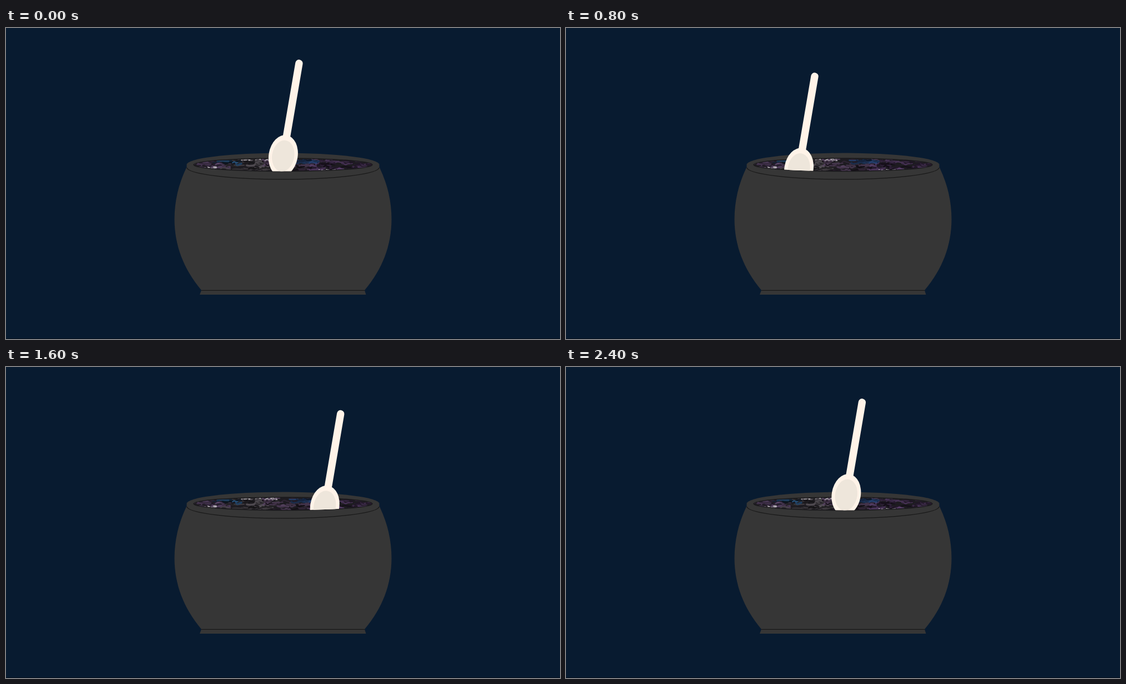
Write an HTML page that moves like this. It is 998 px wide and 561 px high and loops after 2.52 s.

```html
<!DOCTYPE html>
<html lang="en">
<head>
<meta charset="utf-8">
<title>Stirring the pot</title>
<style>
  html, body { margin: 0; width: 100%; height: 100%; overflow: hidden; background: #081b30; }
  svg { display: block; width: 100vw; height: 100vh; }

  /* One lap at constant speed, in 40 ms steps, with a short rest at the end */
  #spoon {
    transform-box: view-box;
    transform-origin: 0 0;
    offset-path: path("M0 0C-42 0 -85 3 -108 9.3Q-122 13.5 -110 17C-92 22 -60 28 -24.5 28C10 28 60 24 91.5 18C112 15.5 118 15 113.5 7.5C110 4 85 4 60 2.4C40 1 20 0 0 0Z");
    offset-rotate: 0deg;
    animation: stir 2520ms infinite;
  }
  @keyframes stir {
    0% { offset-distance: 0%; animation-timing-function: steps(60, end); }
    95.238%, 100% { offset-distance: 98.84%; }
  }
</style>
</head>
<body>
<svg viewBox="0 0 998 561">
  <defs>
    <clipPath id="soupClip"><ellipse cx="499" cy="246.7" rx="161" ry="11.8"/></clipPath>
    <clipPath id="rimClip"><path d="M0 0H998V246.7H660A161 11.8 0 0 1 338 246.7H0Z"/></clipPath>
  </defs>
  <rect width="998" height="561" fill="#081b30"/>
  <rect y="560" width="998" height="1" fill="#040e1a"/>

  <g fill="#363636">
    <path d="M325 252C311 281 303.5 312 303.5 345C303.5 392 320 435 352 473H646C678 435 694.5 392 694.5 345C694.5 312 687 281 673 252Z"/>
    <path d="M352 473H646L648.5 481H349Z"/>
    <path d="M325.5 246.5A173.5 21 0 0 1 672.5 246.5V252A173.5 21.7 0 0 1 325.5 252Z"/>
  </g>
  <g fill="none" stroke="#181818" stroke-width="1.2">
    <path d="M352 473.3H646"/>
    <path d="M325.8 252A173.3 21.7 0 0 0 672.2 252"/>
  </g>

  <g clip-path="url(#soupClip)">
    <rect x="336" y="233" width="326" height="27" fill="#1d1b20"/>
    <g id="soup" fill="none" stroke-linecap="round"></g>
  </g>
  <ellipse cx="499" cy="246.7" rx="161" ry="11.8" fill="none" stroke="#1a1a1c" stroke-width="1.5"/>

  <g clip-path="url(#rimClip)">
    <g id="spoon">
      <path d="M527.9 63.8L504.7 200" stroke="#fff3e8" stroke-width="13.4" stroke-linecap="round"/>
      <g transform="rotate(9.7 499.4 230.2)">
        <ellipse cx="499.4" cy="230.2" rx="26.1" ry="37.3" fill="#fff3e8"/>
        <ellipse cx="499.4" cy="230.7" rx="20" ry="28.4" fill="#eee6db"/>
      </g>
    </g>
  </g>
</svg>
<script>
const soup = document.getElementById('soup');

let seed = 7;
const rand = (a, b) => {
  seed = (seed * 16807) % 2147483647;
  return a + (b - a) * seed / 2147483647;
};

function add(name, attrs) {
  const el = document.createElementNS('http://www.w3.org/2000/svg', name);
  for (const key in attrs) el.setAttribute(key, attrs[key]);
  soup.append(el);
}

// Curly strands of one hue between x0 and x1
function strands(count, x0, x1, hue, sat, y0 = 236, y1 = 258) {
  for (let i = 0; i < count; i++) {
    const x = rand(x0, x1), y = rand(y0, y1), w = rand(4, 10), h = rand(-4, 4);
    add('path', {
      d: `M${x - w} ${y}q${w / 2} ${h} ${w} ${h / 2}t${w} ${-h / 2}`,
      stroke: `hsl(${hue} ${sat}% ${rand(6, 33)}%)`,
      'stroke-width': rand(1.5, 3.5)
    });
  }
}

function specks(count, x0, x1, y0) {
  for (let i = 0; i < count; i++) {
    add('rect', { x: rand(x0, x1), y: rand(y0, y0 + 4), width: rand(1.5, 4), height: 1, fill: '#c4c0c4' });
  }
}

strands(60, 340, 400, 275, 20);
strands(60, 395, 485, 290, 4);
strands(60, 470, 560, 280, 18);
strands(70, 550, 660, 275, 26);
strands(10, 378, 420, 210, 50, 238, 246);
strands(14, 514, 560, 217, 50, 237, 244);
specks(26, 423, 488, 235.5);
specks(18, 355, 378, 249.5);
specks(18, 556, 598, 254.5);
</script>
</body>
</html>
```
